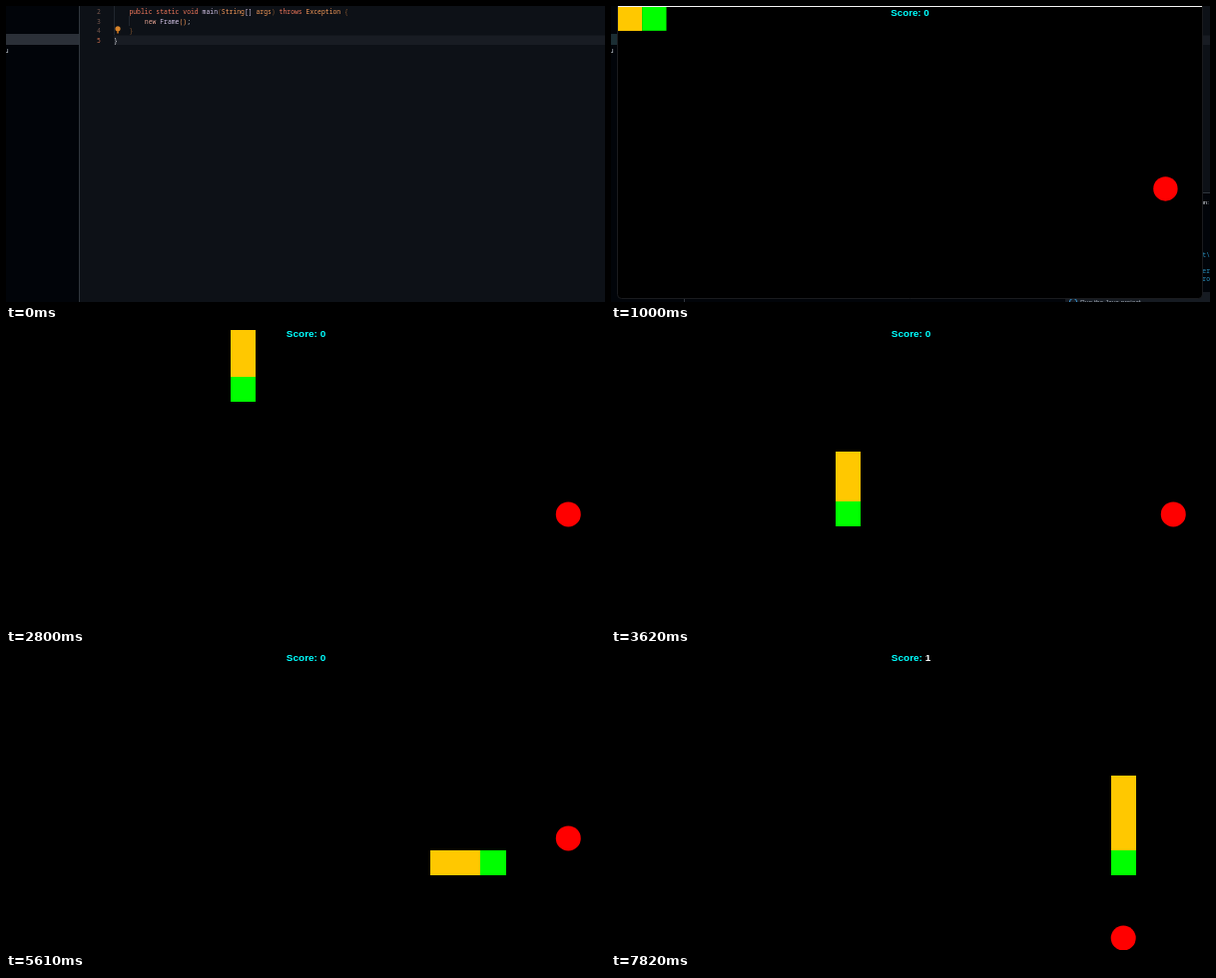
These frames come from a looping animation (600 px wide and 297 px high, 8000 ms). An HTML page with a canvas:

```html
<!DOCTYPE html>
<html lang="en">
<head>
<meta charset="utf-8">
<title>Snake</title>
<style>
  html, body { margin: 0; width: 100%; height: 100%; overflow: hidden; background: #000; }
  canvas { display: block; width: 600px; height: 297px; }
</style>
</head>
<body>
<canvas id="stage" width="600" height="297"></canvas>
<script>
const ctx = document.getElementById('stage').getContext('2d');
const LOOP = 8000;
const TICK = 200;
const CELL = 25.025;
const TOP = -3;
const MONO = '"Noto Sans Mono", "DejaVu Sans Mono", monospace';
const SANS = '"Liberation Sans", Arial, sans-serif';

const MEAL = 31; // step on which the first apple is eaten
const TURNS = [[0, 0], [9, 0], [9, 8], [22, 8], [22, 4], [20, 4], [20, 11]];

function rect(x, y, w, h, color) {
  ctx.fillStyle = color;
  ctx.fillRect(x, y, w, h);
}

function disc(x, y, r, color) {
  ctx.fillStyle = color;
  ctx.beginPath();
  ctx.arc(x, y, r, 0, Math.PI * 2);
  ctx.fill();
}

// Laid out ten times larger so that small glyph advances stay exact.
function text(str, x, y, size, color, family = MONO, weight = '', align = 'left') {
  ctx.save();
  ctx.translate(x, y);
  ctx.scale(0.1, 0.1);
  ctx.font = `${weight} ${size * 10}px ${family}`;
  ctx.textAlign = align;
  ctx.fillStyle = color;
  ctx.fillText(str, 0, 0);
  const width = ctx.measureText(str).width / 10;
  ctx.restore();
  return width;
}

function code(parts, x, y) {
  for (const [str, color] of parts) x += text(str, x, y, 6.42, color);
}

function drawEditor(cursor, panel, output) {
  rect(0, 0, 600, 297, '#0d1117');
  rect(0, 0, 73, 297, '#010409');
  rect(0, 28, 73, 11, panel ? '#1b2e34' : '#2b3038');
  rect(73, 0, 1, 297, '#30363d');
  text('u', -1.2, 47, 6.4, '#c9d1d9');

  rect(108, 29.5, 492, 9.5, '#181c23');
  rect(108, 0, 1, 29, '#20262e');
  rect(123, 10, 1, 10, '#20262e');

  for (let n = 2; n <= 5; n++) {
    text(String(n), 91, 8.2 + (n - 2) * 9.5, 6.42, n === 5 ? '#d0714f' : '#74564c');
  }
  const red = '#f4795c', orange = '#f59a58', pale = '#d3c3e6', dim = '#80542f';
  code([
    ['public static void ', red], ['main', pale], ['(', dim], ['String', orange],
    ['[] ', pale], ['args', orange], [') ', dim], ['throws ', red],
    ['Exception ', orange], ['{', dim]
  ], 123.4, 8.2);
  code([['new ', '#e0a090'], ['Frame', pale], ['()', orange], [';', '#c9d1d9']], 138.8, 17.7);
  code([['}', dim]], 123.4, 27.2);
  code([['}', '#d6d9de']], 108, 36.7);

  disc(112, 22.8, 2.6, '#d8842a');
  rect(111, 25, 2, 2.5, '#a5601c');
  if (cursor) rect(112, 29, 1, 10, '#c9d1d9');

  if (panel) drawPanel(output);
}

function drawPanel(output) {
  rect(74, 187, 526, 110, '#010409');
  rect(74, 187, 526, 1, '#30363d');
  text('Run:', 599, 199, 6.2, '#d6d9de', SANS, '', 'right');
  if (!output) return;
  const blue = '#2b93c0';
  text('bin\\java.exe -cp out\\', 600, 252, 6.42, blue, MONO, '', 'right');
  text('start runner', 600, 268, 6.42, blue, MONO, '', 'right');
  text('main intro', 600, 276, 6.42, blue, MONO, '', 'right');
  rect(455, 287, 145, 10, '#161b22');
  ctx.strokeStyle = '#3c9ad8';
  ctx.lineWidth = 1;
  ctx.beginPath();
  ctx.arc(463, 297, 3.6, 0, Math.PI * 2);
  ctx.stroke();
  text('Run the Java project', 470, 299.8, 6.6, '#a0a8b2', SANS);
}

function cellAt(step) {
  let left = Math.max(0, step);
  for (let i = 1; i < TURNS.length; i++) {
    const [ax, ay] = TURNS[i - 1], [bx, by] = TURNS[i];
    const len = Math.abs(bx - ax) + Math.abs(by - ay);
    if (left <= len) {
      const p = left / len;
      return [ax + (bx - ax) * p, ay + (by - ay) * p];
    }
    left -= len;
  }
  return TURNS[TURNS.length - 1];
}

function drawCell([col, row], color) {
  const x = Math.round(col * CELL), y = Math.round(TOP + row * CELL);
  const right = Math.round((col + 1) * CELL), bottom = Math.round(TOP + (row + 1) * CELL);
  rect(x, y, right - x, bottom - y, color);
}

function drawGame(now) {
  const head = Math.floor((now - 750) / 175);
  const score = head >= MEAL ? 1 : 0;
  const [foodCol, foodRow] = score ? [20, 11] : [22, 7];

  rect(0, 0, 600, 297, '#000');
  disc((foodCol + 0.5) * CELL + 0.2, TOP + (foodRow + 0.5) * CELL + 0.2, 12.5, '#f00');
  for (let i = 2 + score; i > 0; i--) drawCell(cellAt(head - i), '#ffc800');
  drawCell(cellAt(head), '#0f0');

  const x = 280.8;
  const w = text('Score: ', x, 7, 10, '#0ff', SANS, 'bold');
  text(String(score), x + w, 7, 10, score ? '#fff' : '#0ff', SANS, 'bold');
}

// The game window just before it fills the screen.
function drawOpening(now) {
  ctx.save();
  ctx.beginPath();
  ctx.roundRect(7, -5, 585, 298.5, 4);
  ctx.clip();
  rect(0, 0, 600, 297, '#000');
  ctx.translate(6.8, 3.4);
  ctx.scale(0.974, 0.974);
  drawGame(now);
  ctx.restore();
  rect(7, 0, 585, 1, '#f4f4f4');
  ctx.strokeStyle = '#1a1b1e';
  ctx.lineWidth = 1;
  ctx.beginPath();
  ctx.roundRect(6.5, -5, 586, 298.5, 4);
  ctx.stroke();
}

function draw(t) {
  const drift = t < 3000 ? 0 : t < 6800 ? 10 : 20;
  const now = Math.floor((t - drift) / TICK) * TICK;
  if (now < 1200) drawEditor(t >= 210 && t < 600, t >= 600, t >= 800);
  if (now === 1000) drawOpening(now);
  if (now >= 1200) drawGame(now);
}

const begin = performance.now();
function frame() {
  draw((performance.now() - begin) % LOOP);
  requestAnimationFrame(frame);
}
frame();
</script>
</body>
</html>
```
